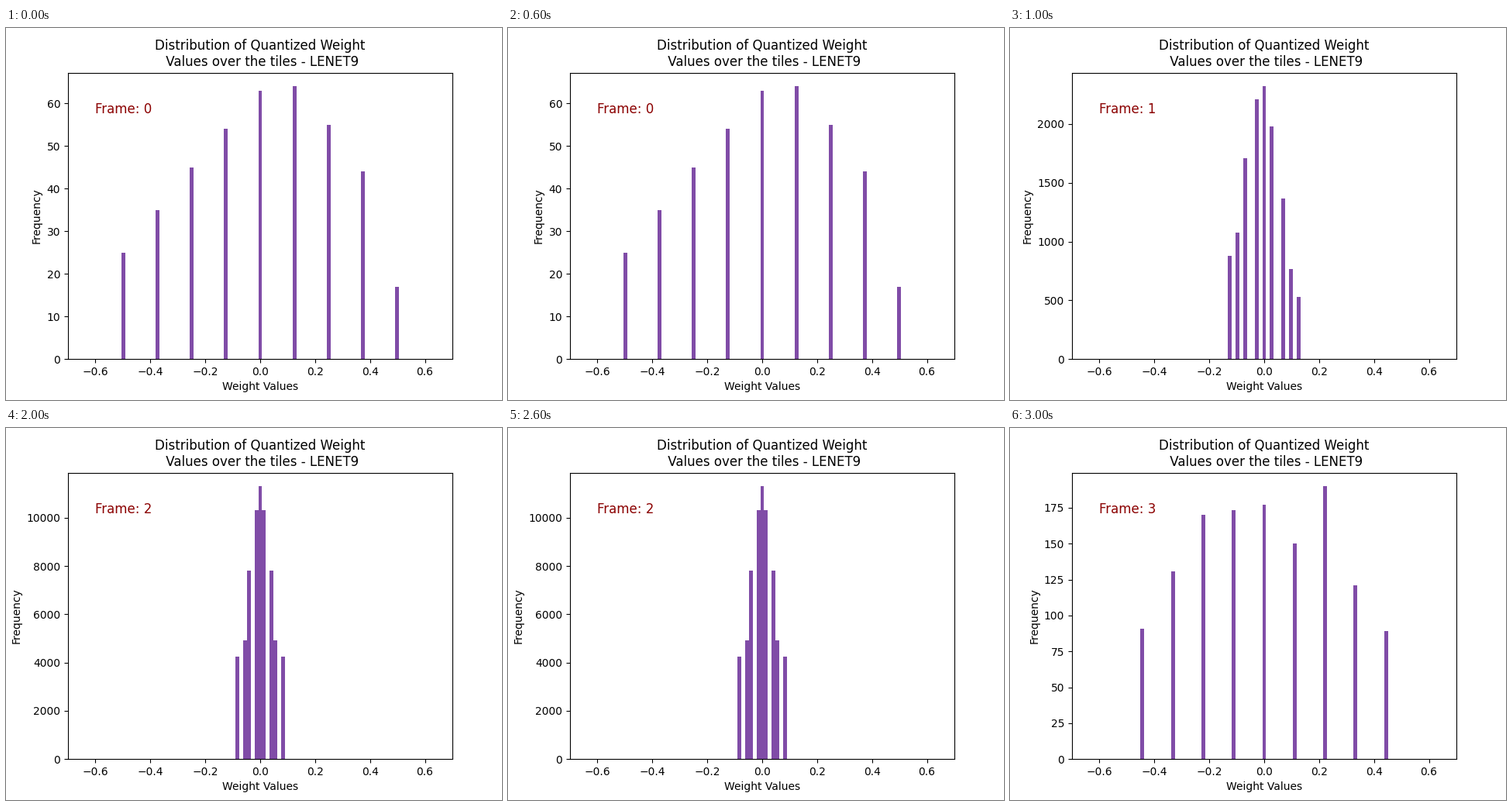
A matplotlib script that plays this animation: 640 px wide and 480 px high, repeating every 4000 ms.

```python
import matplotlib.pyplot as plt
import numpy as np
from matplotlib.animation import FuncAnimation

X_LIMIT = 0.7
BIN_WIDTH = 2 * X_LIMIT / 101
LEVELS = np.arange(-4, 5)
KEY_LEVELS = (-4, -2, 0, 1, 2, 3, 4)


def clipped_bell(peak, mean, variance):
    """Normal curve over the levels, with both tails clipped into the end levels."""
    wide = np.arange(-12, 13)
    density = np.exp((2 * mean * wide - wide**2) / (2 * variance))
    clipped = np.clip(wide, LEVELS[0], LEVELS[-1])
    return peak * np.array([density[clipped == level].sum() for level in LEVELS])


def through(*counts):
    """Straight lines through counts at the key levels."""
    return np.interp(LEVELS, KEY_LEVELS, counts)


# Quantization step and counts per level.
TILES = [
    (1 / 8, through(25, 45, 63, 64, 55, 44, 17)),
    (1 / 32, clipped_bell(2321, -0.27, 4.8)),
    (1 / 50, clipped_bell(11310, 0, 5.4)),
    (1 / 9, through(91, 170, 177, 150, 190, 121, 89)),
]

fig, ax = plt.subplots(figsize=(6.4, 4.8), dpi=100)


def draw(index):
    step, counts = TILES[index]
    centers = np.round(LEVELS * step / BIN_WIDTH) * BIN_WIDTH
    peak = counts.max()

    ax.clear()
    ax.bar(centers, counts, BIN_WIDTH, color="indigo", alpha=0.7)
    ax.set_xlim(-X_LIMIT, X_LIMIT)
    ax.set_ylim(0, 1.05 * peak)
    ax.set_title("Distribution of Quantized Weight\n Values over the tiles - LENET9")
    ax.set_xlabel("Weight Values")
    ax.set_ylabel("Frequency")
    ax.text(-0.6, 0.9 * peak, f"Frame: {index}", fontsize=12, color="darkred")


animation = FuncAnimation(
    fig, draw, frames=len(TILES), init_func=lambda: draw(0),
    interval=1000, repeat=True, repeat_delay=0,
)
plt.show()
```
